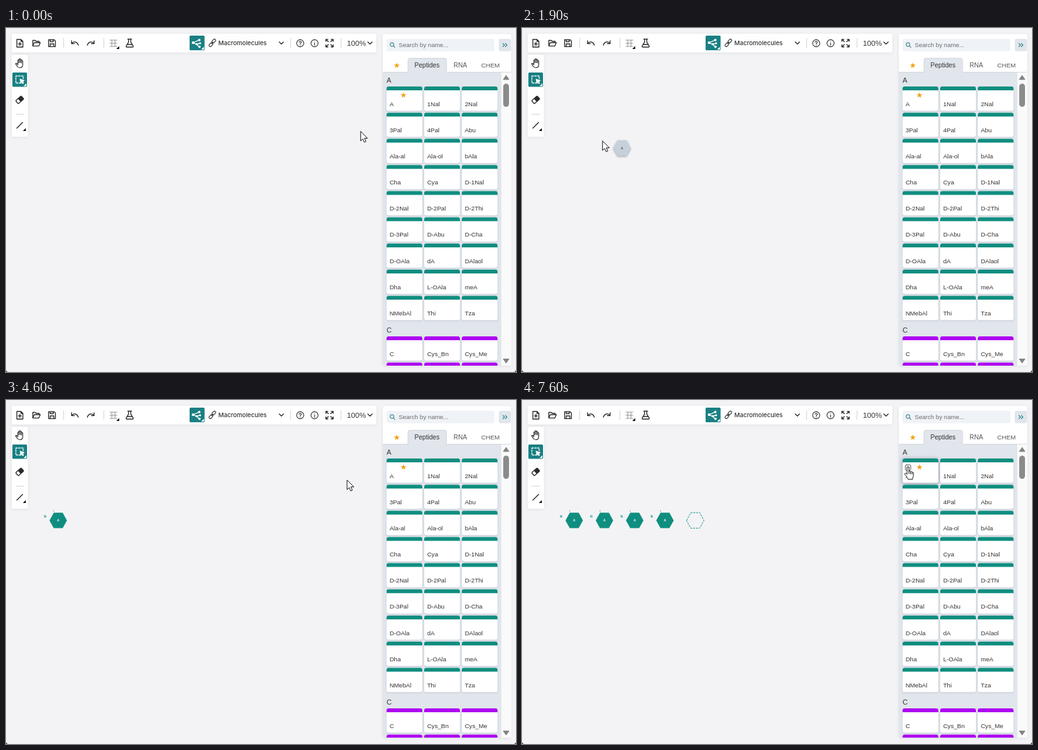
An HTML page that plays this animation: 800x541 px, repeating every 8 s.

```html
<!DOCTYPE html>
<html lang="en">
<head>
<meta charset="utf-8">
<title>Macromolecule editor</title>
<style>
  html, body { margin: 0; width: 100%; height: 100%; overflow: hidden; background: #f3f3f5; }
  svg { display: block; }
  text { font-family: "Liberation Sans", Arial, sans-serif; font-size: 9.6px; fill: #333; }
  .ui { font-family: Inter, sans-serif; font-size: 9.6px; font-weight: 500; }
  .tab { font-size: 10px; letter-spacing: .05px; fill: #585858; }
  .head { font-size: 11px; }
  .tiny { font-size: 5px; font-weight: bold; text-anchor: middle; }
  .bar { fill: #fff; filter: drop-shadow(0 1px 2px rgba(90, 100, 120, .13)); }
  .ico { fill: none; stroke: #2a2a2a; stroke-width: 1.35; stroke-linejoin: round; stroke-linecap: round; }
  .inv { stroke: #fff; }
  .sep { stroke: #d3d5d9; stroke-width: 1; }
  .card { fill: #fff; filter: drop-shadow(0 1px 1px rgba(80, 90, 115, .22)); }
  .card.hot { filter: drop-shadow(0 1px 3px rgba(50, 60, 80, .5)); }
  .teal { fill: #0f8e80; }
  .purple { fill: #ae02f2; }
  #ghost { filter: drop-shadow(0 1.5px 1.5px rgba(60, 70, 85, .5)); }
  #next { fill: none; stroke: #0f8e80; stroke-width: 1; stroke-dasharray: 3 1.5; }
  .cur { fill: #fff; stroke: #111; stroke-width: 1; stroke-linejoin: round; }
</style>
</head>
<body>
<svg width="800" height="541" viewBox="0 0 800 541">
  <defs>
    <path id="hex" d="M-13.7 0L-7 -12.2H7L13.7 0 7 12.2H-7Z" stroke-linejoin="round"/>
    <path id="star" fill="#f1a21b" d="M0 -4.6L1.2 -1.5 4.5 -1.4 1.9 .7 2.8 3.9 0 2.1 -2.8 3.9 -1.9 .7 -4.5 -1.4 -1.2 -1.5Z"/>
    <path id="corner" d="M0 0V-4.5L-4.5 0Z"/>
    <clipPath id="list"><rect x="591" y="69" width="186" height="462"/></clipPath>
  </defs>
  <rect width="800" height="541" fill="#f3f3f5"/>

  <!-- top bar -->
  <rect class="bar" x="9" y="9" width="572" height="29.5" rx="3"/>
  <path class="sep" d="M90.5 16V31M153.5 16V31M446.5 16V31M525.5 16V31"/>
  <g class="ico">
    <path d="M17 18H23.5L26.5 21V30H17ZM23.5 18V21H26.5M21.8 22.5V27.5M19.5 25H24"/>
    <path d="M42 28V19.5H46L47.5 21H52V23M42 28L44.5 23H53.8L51.5 28.3H42"/>
    <path d="M66.8 18.5H75.5L77.5 20.5V29.3H66.8ZM69.3 18.5V21.5H74.2V18.5M69.3 29V25H75V29"/>
    <path d="M102.8 20V24.5H107.2M103 24.3C106 20.4 111.5 21.2 113.4 27"/>
    <path d="M138.2 20V24.5H133.8M138 24.3C135 20.4 129.5 21.2 127.6 27"/>
    <path stroke="#8d8f93" stroke-width="1.1" stroke-dasharray="1.6 1" d="M163 19H174M163 24H174M163 29H174M166 19V29M171 19V29"/>
    <path d="M191 17.5H197M192.3 17.5V22.2L188.6 28.2Q188 30 189.6 30H198.4Q200 30 199.4 28.2L195.7 22.2V17.5M190.5 26H197.5"/>
  </g>
  <use href="#corner" x="177.5" y="33"/>
  <rect x="288" y="12" width="23.5" height="23" rx="1.5" fill="#1a8083"/>
  <g class="ico inv" stroke-width="1.1">
    <path d="M294 23L303 18.8M294 23.5L298.5 25.5 304 30M298.5 25.5L304.5 24"/>
    <g fill="#fff" stroke="none"><circle cx="293.6" cy="23.2" r="2.1"/><circle cx="303.2" cy="18.8" r="1.9"/><circle cx="299" cy="25.5" r="1.7"/><circle cx="304.5" cy="24" r="1.6"/><circle cx="303.5" cy="29.6" r="1.9"/></g>
  </g>
  <use href="#corner" x="310.5" y="34" fill="#fff"/>
  <g class="ico">
    <g stroke-width="1.1">
      <rect x="-3.4" y="-2" width="6.8" height="4" rx="2" transform="translate(326 20.5) rotate(-45)"/>
      <rect x="-3.4" y="-2" width="6.8" height="4" rx="2" transform="translate(321.4 26.2) rotate(-45)"/>
      <path d="M322.4 25L325 22"/>
    </g>
    <path d="M428.7 22L432 25.3 435.3 22M567.5 22L571 25.3 574.5 22"/>
    <g stroke-width="1.1">
      <circle cx="461.5" cy="24" r="5.6"/><circle cx="484" cy="24" r="5.6"/>
      <path d="M459.8 22.6C459.9 20.3 463.3 20.5 463.2 22.6 463.1 23.8 461.5 23.8 461.5 25.2M461.5 27V27.2M484 23.3V27.2M484 21V21.1"/>
    </g>
    <path d="M501.8 21V17.8H505M510 17.8H513.2V21M513.2 26.5V29.7H510M505 29.7H501.8V26.5M502 18L505.6 21.6M513 18L509.4 21.6M513 29.5L509.4 25.9M502 29.5L505.6 25.9"/>
  </g>
  <text class="ui" x="333" y="27">Macromolecules</text>
  <text x="534.8" y="27.5" style="font-size:11.7px">100%</text>

  <!-- left bar -->
  <rect class="bar" x="9" y="42" width="25.5" height="129" rx="3"/>
  <path class="ico" d="M18.6 57.5V51.2Q18.6 50 19.5 50T20.4 51.2V54.5 49.6Q20.4 48.4 21.4 48.4T22.4 49.6V54.5 50.2Q22.4 49.2 23.3 49.2T24.3 50.2V55 52.2Q24.3 51.2 25.2 51.2T26.2 52.2V57.5Q26.2 62.5 21.8 62.5 19 62.5 17.5 60L15.2 56.6Q15.1 55.4 16.4 55.5Z" style="stroke-width:1.2"/>
  <rect x="10" y="70" width="23" height="22.5" rx="1.5" fill="#1a8083"/>
  <rect class="ico inv" x="15.5" y="75.5" width="11.5" height="11" stroke-dasharray="2.4 2"/>
  <path d="M21.5 79.5L29.5 82.8 26.3 84.2 28 87.2 26.6 88 25 85.1 22.8 87.4Z" fill="#fff"/>
  <use href="#corner" x="32" y="91.5" fill="#fff"/>
  <g transform="translate(21.5 113) rotate(-42)"><rect class="ico" x="-5.7" y="-3.2" width="11.4" height="6.4" rx="1"/><rect x="-1" y="-3.2" width="6.7" height="6.4" rx="1" fill="#2a2a2a"/></g>
  <path class="sep" d="M15 135.5H28.5"/>
  <path class="ico" d="M17 157.5L26 148.5"/>
  <use href="#corner" x="31" y="162"/>

  <!-- library -->
  <rect class="bar" x="591" y="9.5" width="201.5" height="521.5" rx="3"/>
  <rect x="597" y="17" width="169" height="19.5" rx="3" fill="#eff2f6"/>
  <g class="ico" style="stroke:#4a8f95;stroke-width:1.2"><circle cx="605.5" cy="26" r="2.8"/><path d="M607.7 28.2L610 30.5"/></g>
  <text x="616" y="30.2" fill="#666" style="fill:#6a6c70">Search by name...</text>
  <rect x="773" y="17" width="19" height="19.5" rx="3" fill="#e1e5ec"/>
  <path class="ico" style="stroke:#1a8083;stroke-width:1.2" d="M779.5 24.3L782 26.8 779.5 29.3M783.3 24.3L785.8 26.8 783.3 29.3"/>
  <path d="M591 69.5H777V531H594Q591 531 591 528Z" fill="#e1e5ec"/>
  <path d="M591 69.5H630.5V50.5Q630.5 47.5 633.5 47.5H688Q691 47.5 691 50.5V69.5H792" fill="#e1e5ec" stroke="#cdd1d9" stroke-width=".8"/>
  <path d="M631 69.5H690.6" stroke="#e1e5ec" stroke-width="1.4"/>
  <use href="#star" x="613" y="59"/>
  <text class="tab" x="640.7" y="62.3" style="fill:#333">Peptides</text>
  <text class="tab" x="702" y="62.3">RNA</text>
  <text class="tab" x="745.5" y="62.3" style="font-size:9.8px">CHEM</text>
  <rect x="777" y="70" width="15.5" height="461" fill="#fafafa"/>
  <path d="M784.5 74.5L789 81H780ZM784.5 527L789 520.5H780Z" fill="#848484" stroke="#848484" stroke-linejoin="round"/>
  <rect x="780" y="87.5" width="9" height="36.5" rx="4.5" fill="#8b8b8b"/>
  <text class="head" x="597" y="86">A</text>
  <text class="head" x="597" y="478.8">C</text>
  <g id="cards" clip-path="url(#list)"></g>
  <use href="#star" x="623.5" y="105.7"/>
  <g id="plus" class="ico" style="stroke:#b9bcc2;stroke-width:.9"><rect x="601.3" y="102" width="8.6" height="8.6" rx="2"/><path d="M605.6 104V108.6M603.3 106.3H607.9"/></g>

  <!-- canvas -->
  <g id="chain"></g>
  <use id="next" href="#hex"/>
  <g id="ghost"><use href="#hex" fill="#c6d0db"/><text class="tiny" y="1.8" style="fill:#4a5058">A</text></g>

  <path d="M0 538V541H3Q.6 540.4 0 538ZM800 538V541H797Q799.4 540.4 800 538Z" fill="#333"/>
  <g id="cursor">
    <path id="arrow" class="cur" d="M.3 .5V15.6L3.7 12.4 6.1 17.7 8.6 16.6 6.3 11.4H11Z"/>
    <path id="hand" class="cur" transform="translate(-5.4 .3)" d="M4 1.6C4 -.4 7 -.4 7 1.6V7.4C7.3 5.9 9.4 6.2 9.5 7.8 10 6.7 11.8 7 11.9 8.5 12.5 7.7 14 8 14 9.4V13.4C14 15.4 12.6 16.6 12.6 19.4H5.5C5.2 16.5 1 13 .5 11.4 0 10 1.4 9.2 2.5 10.2L4 11.6ZM7 7.4V11M9.5 7.8V11.3M11.9 8.5V11.6"/>
  </g>
</svg>
<script>
const LOOP = 8000, STEP = 100, LAG = 80;
const $ = id => document.getElementById(id);
const show = (id, on) => $(id).style.display = on ? '' : 'none';
const put = (id, x, y) => $(id).setAttribute('transform', `translate(${x.toFixed(2)} ${y.toFixed(2)})`);

const peptides = 'A 1Nal 2Nal 3Pal 4Pal Abu Ala-al Ala-ol bAla Cha Cya D-1Nal D-2Nal D-2Pal D-2Thi D-3Pal D-Abu D-Cha D-OAla dA DAlaol Dha L-OAla meA NMebAl Thi Tza'.split(' ');
const cysteines = ['C', 'Cys_Bn', 'Cys_Me', '', '', ''];

function cards(names, top, color) {
  return names.map((name, i) => {
    const x = 597 + i % 3 * 59, y = top + Math.floor(i / 3) * 41.15;
    return `<rect class="card" x="${x}" y="${y}" width="56" height="38.2" rx="3"/>
      <path class="${color}" d="M${x} ${y + 6}v-3q0 -3 3 -3h50q3 0 3 3v3z"/>
      <text x="${x + 4.7}" y="${y + 30.6}">${name}</text>`;
  }).join('');
}
$('cards').innerHTML = cards(peptides, 92, 'teal') + cards(cysteines, 485, 'purple');
const firstCard = document.querySelector('.card');

const slot = i => 81.9 + i * 47.45, ROW = 189.4;
$('chain').innerHTML = [0, 1, 2, 3].map(i => `<g transform="translate(${slot(i)} ${ROW})">
  <use href="#hex" class="teal"/><text class="tiny" y="2" style="fill:#fff">A</text>
  <text class="tiny teal" x="-20.6" y="-4" style="fill:#0f8e80">N</text>
  <text class="tiny" x="-7" y="-13" style="fill:#0f8e80;font-size:4px;font-weight:normal">1</text></g>`).join('');
const monomers = [...$('chain').children];
const added = [2800, 5300, 6400, 7200];

// time, x, y of the pointer tip
const path = [
  [0, 556, 162], [250, 588, 138], [500, 616, 118], [800, 616, 116], [1000, 591, 128],
  [1200, 490, 146], [1400, 350, 164], [1600, 215, 175], [1800, 147, 177], [1900, 126, 177],
  [2000, 110, 177], [2300, 82, 177], [2700, 69, 177], [2800, 69, 177], [3000, 92, 182],
  [3200, 138, 190], [3400, 162.5, 194.5], [3700, 162.5, 194.5], [3800, 166.5, 194.5],
  [3900, 166.5, 194.5], [4100, 215, 186], [4400, 420, 150], [4700, 592, 113], [4900, 605.4, 105]
];
function pointer(t) {
  const i = path.findIndex(p => p[0] > t);
  if (i < 0) return path[path.length - 1].slice(1);
  const [t0, x0, y0] = path[i - 1], [t1, x1, y1] = path[i], k = (t - t0) / (t1 - t0);
  return [x0 + (x1 - x0) * k, y0 + (y1 - y0) * k];
}

function draw(t) {
  const [x, y] = pointer(t);
  put('cursor', x, y);
  const overCard = (t >= 400 && t < 1100) || t >= 4800;
  show('hand', overCard);
  show('arrow', !overCard);
  show('plus', overCard);
  $('plus').style.stroke = t >= 4900 ? '#444' : '#b9bcc2';
  firstCard.classList.toggle('hot', overCard);

  const dragging = t >= 900 && t < 2800;
  show('ghost', dragging);
  if (dragging) {
    const [gx, gy] = pointer(t - LAG);
    put('ghost', gx + 14, gy + 12);
  }

  const count = added.filter(a => t >= a).length;
  monomers.forEach((m, i) => m.style.display = i < count ? '' : 'none');
  show('next', t >= 4900);
  put('next', slot(count), ROW);
}

const start = performance.now();
function tick() {
  const t = (performance.now() - start) % LOOP;
  draw(Math.floor(t / STEP) * STEP);
  requestAnimationFrame(tick);
}
tick();
</script>
</body>
</html>
```
